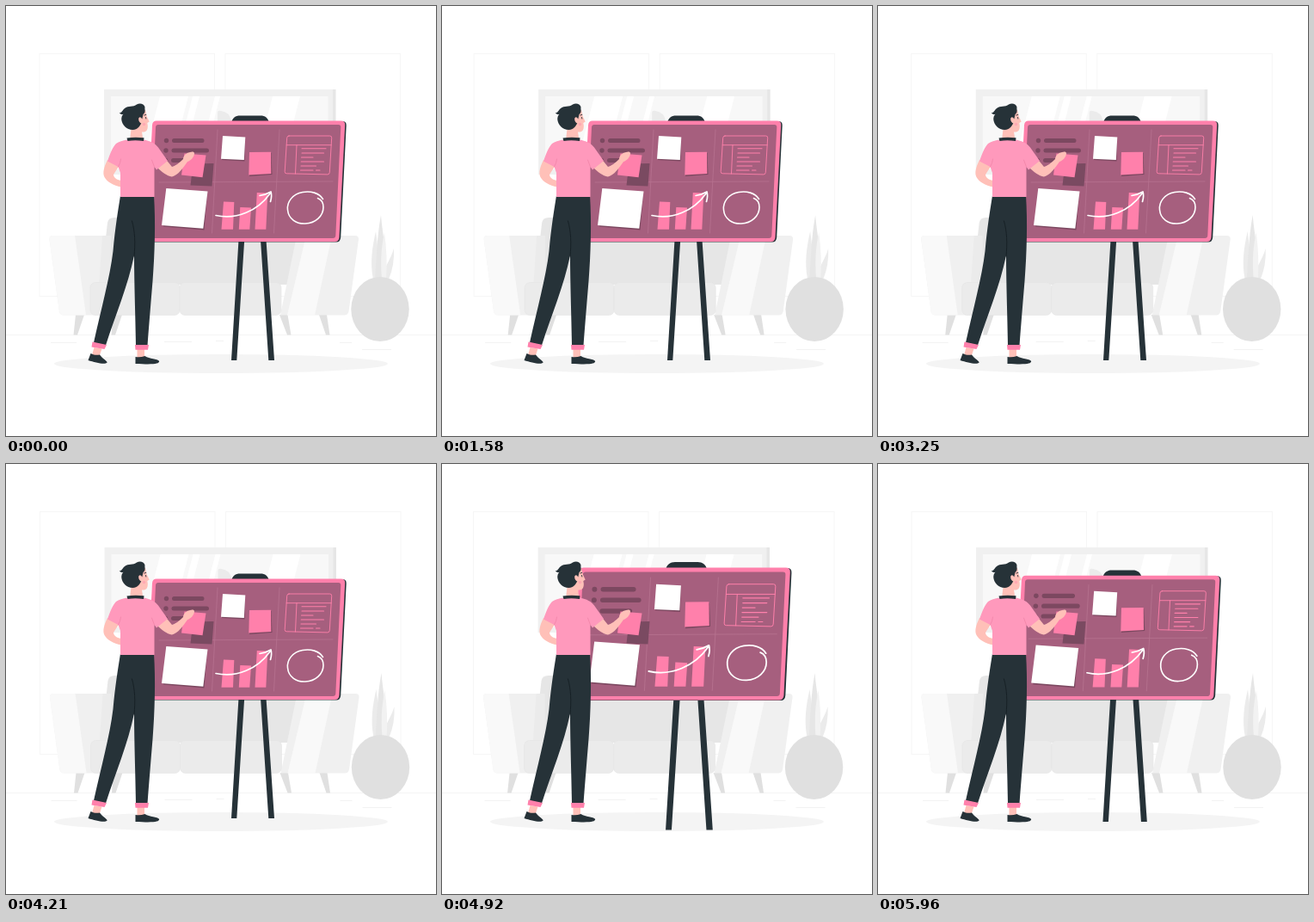
An HTML page that plays this animation: 500x500 px, repeating every 6 s.

```html
<!DOCTYPE html>
<html lang="en">
<head>
<meta charset="utf-8">
<title>Planning board</title>
<style>
html, body { margin: 0; width: 100%; height: 100%; overflow: hidden; background: #fff; }
svg { display: block; width: 100vw; height: 100vh; }
.ink { fill: #263238; }
.pink { fill: #ff80ab; }
.skin { fill: #ffc0b8; }
.shirt { fill: #ff99bc; }
.shade { fill: #7c4860; }
.white { fill: #fff; }
.line { fill: none; stroke-linecap: round; stroke-linejoin: round; }
</style>
</head>
<body>
<svg viewBox="0 0 500 500">
  <g id="room">
    <g fill="none" stroke="#f6f6f6">
      <rect x="39" y="55.500" width="203.500" height="282"/>
      <rect x="255" y="55.500" width="203.500" height="282"/>
    </g>
    <path d="M-10 382.500H510" stroke="#ececec" stroke-width=".6"/>
    <path d="M184 390.500h32M244 389.500h9M414 399.500h34M388 391.500h14M52 391.500h30" stroke="#f2f2f2"/>

    <!-- picture -->
    <path fill="#e6e6e6" d="M376 97h7.500v99H376z"/>
    <path fill="#f0f0f0" d="M114 97h266v99H114z"/>
    <path fill="#f8f8f8" d="M122 105h252.500v85H122z"/>
    <path fill="#fff" d="M179 105h33l-22 85h-33zM217 105h8l-22 85h-8zM243 105h6l-22 85h-6zM310 105h32l-22 85h-32z"/>
    <path fill="#ebebeb" d="M246 134V124q0-3 4-2q10 1 12 12z"/>

    <!-- sofa -->
    <path fill="#e0e0e0" d="M81 359h10l-8 23.500h-4.500zM124 359h11l-8 23.500h-4.500zM318 359h9.500l4 23.500H327zM364 359h9l3.500 23.500H372z"/>
    <path fill="#e6e6e6" d="M118 252q1-6 8-6H332q7 0 8 6l6 72H110z"/>
    <path fill="#f0f0f0" d="M54 267H121l-16 92.500H67q-4 0-5-4L50.500 271q0-4 3.500-4z"/>
    <path fill="#f9f9f9" d="M54 267H80l13 92.500H67q-4 0-5-4L50.500 271q0-4 3.500-4z"/>
    <path fill="#ebebeb" d="M112 267h10v60h-14z"/>
    <path fill="#f0f0f0" d="M338 267H406q4 0 4 4L398.500 355q-1 4.500-5 4.500H319z"/>
    <path fill="#f9f9f9" d="M349 267H379L359 359.500H327z"/>
    <g fill="#ebebeb" stroke="#e5e5e5" stroke-width=".6">
      <rect x="98" y="321.500" width="104" height="38" rx="6"/>
      <rect x="202" y="321.500" width="118" height="38" rx="6"/>
    </g>

    <!-- plant -->
    <path fill="#ebebeb" d="M427 318C423 298 426 280 430 262Q434 290 433 318zM437 318C440 302 447 296 451 282Q452 301 445 318z"/>
    <path fill="#e6e6e6" d="M429 318C431 294 431 270 436 243C438 269 444 287 440 318z"/>
    <path fill="#f2f2f2" d="M437 318C435 293 437 278 440 263Q444 292 442 318z"/>
    <ellipse cx="435" cy="352.500" rx="33.700" ry="37.500" fill="#e0e0e0"/>
  </g>

  <ellipse cx="250" cy="416" rx="194" ry="11" fill="#f4f4f4"/>

  <g id="board">
    <path class="ink" d="M262 136C263 130 267 127.500 272 127.500H296C301 127.500 305 130 306 136zM270.500 272H277.200L268.300 412H262zM296 272H302.500L312 412H305.300z"/>
    <path class="ink" d="M178 134H391q5 0 4.700 5L389.200 269q-.4 5.500-5 5.500H169z"/>
    <path class="pink" d="M175 133.500H389.500q5 0 4.700 5L387.500 269q-.4 5-5 5H168q-5 0-4.700-5L170 138.500q.4-5 5-5z"/>
    <path fill="#a65f7e" d="M177 138H386.500q3 0 2.800 3L383.300 267q-.2 3-3.200 3H171q-3 0-2.800-3L174 141q.2-3 3-3z"/>
    <path class="line" stroke="#b97592" stroke-width=".7" d="M246 144L239.500 264M318 144L311.500 264M178 205L380 204"/>

    <!-- bullet list -->
    <g class="shade">
      <circle cx="186.500" cy="156.500" r="2.700"/>
      <circle cx="186" cy="168" r="2.700"/>
      <circle cx="185.500" cy="179.500" r="2.700"/>
    </g>
    <path class="line" stroke="#7c4860" stroke-width="5" d="M195.500 156.500H228M195 168H233.500M194.500 179.500H224"/>

    <!-- notes -->
    <path class="shade" d="M253 153L278 154L277.500 180.500L251 179zM284 171L308.500 171L309.500 196L283 198zM187 214L234 217L230.500 260.500L183 256.500z"/>
    <path class="white" d="M252 151L278.300 152.500L276.800 179L250 177.800zM186.300 212L234.500 215.500L229.300 258.700L181 255z"/>
    <path class="pink" d="M283 170L308 169.700L308.300 195L282.300 196.500z"/>

    <!-- table -->
    <path class="line" stroke="#ff80ab" stroke-width=".9" d="M329 151H376.500q2.300 0 2.200 2.300L376.300 193.500q-.2 2.400-2.500 2.400L326.300 194.800q-2.300 0-2.100-2.300L326.700 153.300q.2-2.300 2.300-2.300zM326.200 161.700H378.200M338 161.700L336.500 195"/>
    <path class="line" stroke="#ff80ab" stroke-width="1.100" d="M344 165.700H372M344 171H369.500M343.500 176H357M343.200 181H369.500M343 186H360.500M342.500 191H357M360.500 191H365"/>

    <!-- chart -->
    <path class="pink" d="M253 227.500L265.300 228L264 259.800H250.500zM272.300 234L285 234.500L283.300 259.800H270.800zM291.800 217L304.300 217.500L302.300 259.800H289.500z"/>
    <path class="line" stroke="#fff" stroke-width="1.700" d="M244 243.500C268 249 293 238 307 218M295 220.500Q302 219.500 308 216Q309.500 221 307.500 227.500"/>
    <path class="line" stroke="#fff" stroke-width="1.600" d="M368.500 224.500C364 217 354 215 345 216.500C333 218.500 326.500 228 327.500 237C328.500 248 338 253.500 348 253C360 252.500 369 244 369 234C369 228 366.500 225 362.500 223.500"/>
  </g>

  <g id="man">
    <path fill="#7a4a61" d="M217.500 183.500L241.500 183L239.500 209.500L214.500 208.500z"/>
    <path class="pink" d="M207.500 171.500L232.500 173.500L228.500 199.300L204 196.500z"/>

    <!-- far arm -->
    <path class="skin" d="M118 179C114 187 112 194 114.500 199C117 204 125 209 134 210.500V203C128 202 125 199 125 196L132 185z"/>

    <!-- legs -->
    <path class="skin" d="M102.500 397L111.500 398.500L108 409L100 406zM152.500 398H161V410H152.500z"/>
    <path class="ink" d="M98.500 404C102 406 106 406 109 405.500C112 410 117 412 117.700 414.500C115 417.500 104 414.500 95.500 412zM150.500 408Q156 409 161.500 407C167 410.500 176 410 178.200 413C178 416.300 172 417 150.500 416z"/>
    <path class="ink" d="M133 220.500H172C174 252 173 288 170.500 320C168 350 166 375 164.500 395H151C150.500 360 149 322 149 290C142 325 127 360 116 394.500L102 391.500C110 355 121 315 124.500 285C127 257 130 240 133 220.500z"/>
    <path class="line" stroke="#162025" d="M146.500 250C150 262 150.500 276 149 291"/>
    <path class="pink" d="M100.500 390.500L117 394L114.500 399L99.500 396.500zM150 394H166L165 399.700H150.500z"/>

    <!-- head -->
    <path class="skin" d="M146 139L144 156H159.500L158 146.500C163 147 165 144.500 164.800 139L164.300 136L166.700 134.500L163.800 128.500L162 121L150 119z"/>
    <circle cx="160.500" cy="137.500" r="1.800" fill="#ffa9b3"/>
    <path class="line" stroke="#263238" stroke-width=".9" d="M162.500 129.500l.3 1.500M160.800 127l2-.6"/>
    <path class="ink" d="M138.500 140.500C133.500 135 133 129 136.500 125.700C135 126.200 133 126 131.800 124.200C134.500 124.700 135.500 121 138 119C142 115.500 148 118 152 114.500C155.500 112.500 160.500 113.500 161.500 117.500C161 120.500 163 123.500 159.500 126L158.300 131.500C156.500 128 154 129 154.200 132C154.400 134.500 156 136 157.300 136.500C155 140 153 144 147.500 144C143.500 144 141 142.500 138.500 140.500z"/>

    <!-- near arm and shirt -->
    <path class="skin" d="M176 188C181 193 187 197.500 193 198.500C200 197 206 188 211 181C215 180 219 175 219 171.500C219 169 216 169.500 214 170C209 171 206.500 174 206 178C202 182 197 186 193 187L184 176z"/>
    <path class="shirt" d="M141 155.500H160.500C168 157 174 160 177 164.500L188 180L175 190.500L172.500 187V222H133V194L130.500 187L118 180.500C121 172 124 164 128 160C131 157.500 136 156.500 141 155.500z"/>
    <path class="line" stroke="#f084a8" stroke-width=".8" d="M130.500 187Q133 183 133.500 178M172.500 187L169.500 179"/>
    <path class="ink" d="M140.500 153.500Q150 152 160.500 153.300L160 157Q150 155.500 141.500 157z"/>
  </g>
</svg>
<script>
const LOOP = 6000;
const SECOND_SHAKE = 2880;

// [ms, offset in px]
const shake = [0, -1, 2, -4, 4, -4, 4, -4, 2, -1, 0].map((x, i) => [i * 300, x]);

// [ms, scale]
const pulse = [[4400, 1], [4460, 1.01], [4580, 1.035], [4950, 1.1],
  [5250, 1.079], [5710, 1.044], [6000, 1.025]];

const room = document.getElementById('room');
const board = document.getElementById('board');

function valueAt(keys, t) {
  if (t <= keys[0][0]) return keys[0][1];
  for (let i = 1; i < keys.length; i++) {
    const [t0, v0] = keys[i - 1];
    const [t1, v1] = keys[i];
    if (t <= t1) return v0 + (v1 - v0) * (t - t0) / (t1 - t0);
  }
  return keys[keys.length - 1][1];
}

function draw(now) {
  const t = now % LOOP;
  const x = valueAt(shake, t < SECOND_SHAKE ? t : t - SECOND_SHAKE);
  const s = valueAt(pulse, t);
  room.setAttribute('transform', `translate(${x} 0)`);
  board.setAttribute('transform', `translate(282.5 270) scale(${s}) translate(-282.5 -270)`);
}

const start = performance.now();
function tick() {
  draw(performance.now() - start);
  requestAnimationFrame(tick);
}
tick();
</script>
</body>
</html>
```
